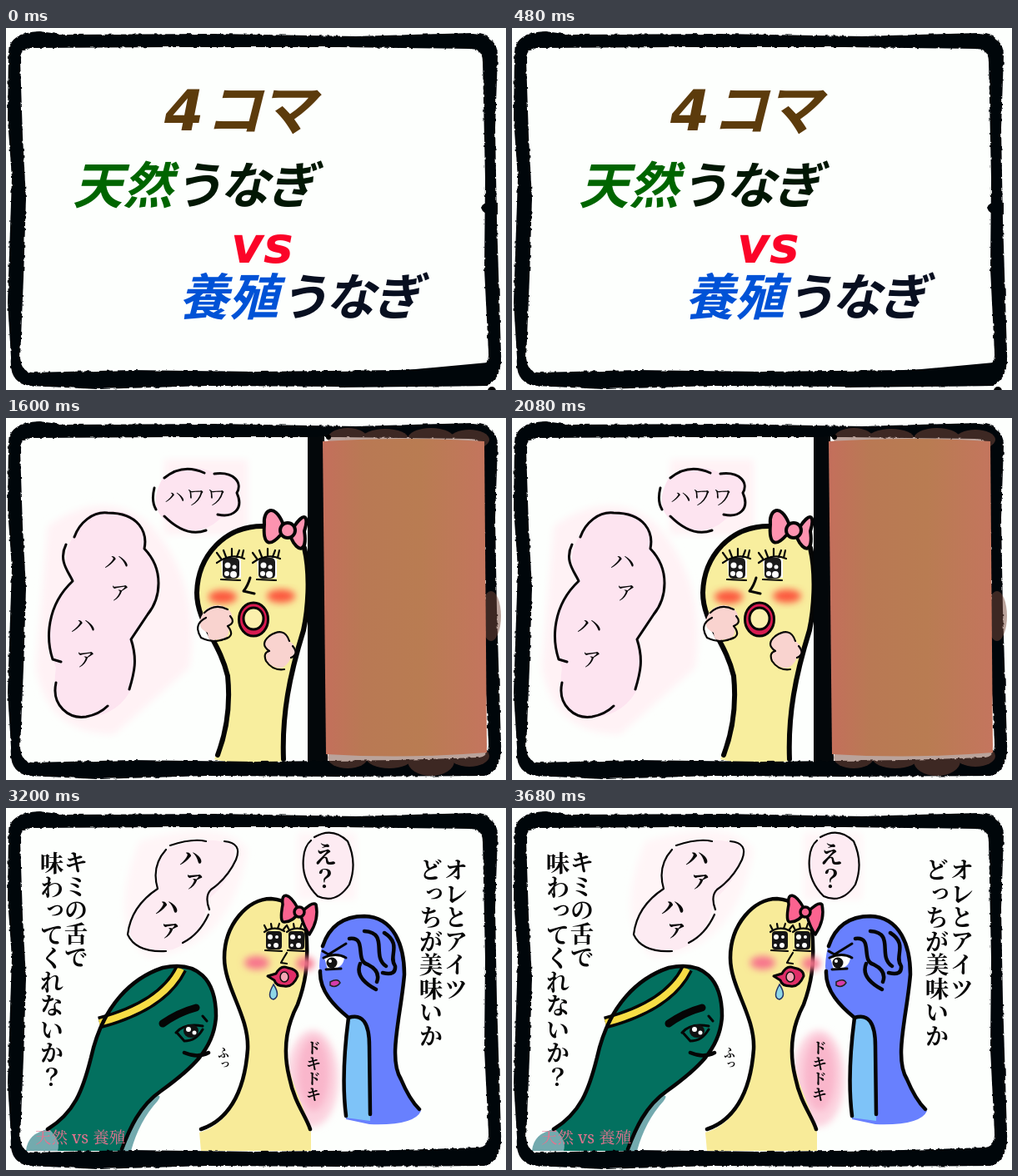
Recreate the animation shown at these times as an HTML page. Size 600 by 435 pixels, loop 4000 ms.

```html
<!DOCTYPE html>
<html lang="ja">
<head>
<meta charset="utf-8">
<title>Eel comic</title>
<style>
html, body { margin: 0; width: 100%; height: 100%; overflow: hidden; background: #fdfffd; }
svg { display: block; width: 600px; height: 435px; }
.panel { visibility: hidden; animation: show 4s step-end infinite; animation-delay: calc(var(--i) * .8s - 4s); }
@keyframes show { 0% { visibility: visible; } 20%, 100% { visibility: hidden; } }
.ink { fill: none; stroke: #050505; stroke-width: 4.5; stroke-linecap: round; stroke-linejoin: round; }
.thin { stroke-width: 2.2; }
.edge { stroke: #050505; stroke-width: 4; stroke-linejoin: round; }
.soft { filter: url(#blur); }
text { font-family: "Noto Serif CJK JP", "Noto Sans CJK JP", "Noto Sans CJK", sans-serif; font-weight: 700; fill: #080808; }
.title { font: italic bold 60px "DejaVu Sans", "Noto Sans CJK JP", "Noto Sans CJK", sans-serif; }
.kana { letter-spacing: -4px; }
.v { writing-mode: vertical-rl; }
.hand { font-weight: 500; }
</style>
</head>
<body>
<svg viewBox="0 0 600 435">
<defs>
  <filter id="rough" x="0" y="0" width="600" height="435" filterUnits="userSpaceOnUse" color-interpolation-filters="sRGB">
    <feTurbulence type="fractalNoise" baseFrequency=".2" numOctaves="1" seed="4"/>
    <feDisplacementMap in="SourceGraphic" scale="4" xChannelSelector="R" yChannelSelector="G"/>
  </filter>
  <filter id="blur" x="-40%" y="-40%" width="180%" height="180%"><feGaussianBlur stdDeviation="4"/></filter>
  <linearGradient id="bark">
    <stop offset="0" stop-color="#c46f5c"/><stop offset=".25" stop-color="#b97954"/>
    <stop offset=".6" stop-color="#b97c52"/><stop offset="1" stop-color="#c4755e"/>
  </linearGradient>
  <linearGradient id="redbark">
    <stop offset="0" stop-color="#b5271c"/><stop offset=".22" stop-color="#a0382a"/>
    <stop offset=".65" stop-color="#a2422e"/><stop offset="1" stop-color="#bd2a1a"/>
  </linearGradient>
  <linearGradient id="ugreen"><stop offset="0" stop-color="#033806"/><stop offset=".4" stop-color="#021704"/></linearGradient>
  <path id="spark" d="M0-8L2-3L6-6L4-1L8 0L4 2L6 6L2 4L0 8L-2 4L-6 6L-4 2L-8 0L-4-1L-6-6L-2-3Z" fill="#f23ad0" stroke="#f9a5e9"/>
</defs>
<rect width="600" height="435" fill="#fdfffd"/>

<g class="panel" style="--i:0">
  <text class="title kana" x="190" y="123" style="font-size:68px;fill:#5c3b0c">4<tspan dx="6">コマ</tspan></text>
  <text class="title" x="80" y="211" style="fill:#006500">天然<tspan class="kana" fill="url(#ugreen)">うなぎ</tspan></text>
  <text class="title" x="270" y="282" style="fill:#fb0428">vs</text>
  <text class="title" x="207" y="345" style="fill:#0052d6">養殖<tspan class="kana" fill="#080f20">うなぎ</tspan></text>
  <path d="M570 216Q572 208 590 210V224Q573 226 570 216ZM395 422L480 411L578 402V430L400 432Z" fill="#00060a"/>
  <circle cx="583" cy="436" r="5"/>
</g>

<g class="panel" style="--i:1">
  <path d="M146 64C153 46 180 44 200 34C214 20 232 32 252 41C256 52 252 62 253 66C280 70 284 92 268 106C280 120 272 138 252 140C250 157 234 157 220 152H186C168 158 150 156 144 143C122 142 104 126 112 112Q126 110 128 103C116 82 126 66 146 64Z" fill="#60ae02"/>
  <path d="M190 138Q202 130 216 142C216 180 224 220 236 240L196 298C176 300 160 292 146 286C180 250 188 200 190 138Z" fill="#b9572d"/>
  <path class="ink" d="M144 64C120 66 116 88 129 103C109 112 111 140 143 142C148 156 168 158 183 149M253 67C281 72 283 92 268 106C281 119 273 138 252 140C249 156 234 158 221 153M186 118C187 190 188 240 147 286M221 118C214 170 222 214 236 240"/>
  <path d="M137 207C136 190 163 188 164 207C164 220 156 224 154 240Q157 252 160 262L151 258C145 240 147 230 142 222Q137 216 137 207Z" fill="#f9efa7"/>
  <path class="ink" style="stroke-width:2.5" d="M150 260C146 244 148 230 142 222C132 210 138 194 151 194C164 196 168 212 160 222C152 234 154 246 160 260M147 228l1 8M155 227l-1 8"/>
  <g fill="#fb8549"><circle cx="142" cy="212" r="3"/><circle cx="158" cy="212" r="3"/></g>
  <g fill="#111"><circle cx="146" cy="207" r="2.5"/><circle cx="155" cy="206" r="2.5"/><ellipse cx="149" cy="214" rx="4" ry="4"/></g>
  <path d="M162 196L155 190L162 188L165 192L171 189L169 201Z" fill="#f0307e" stroke="#222" stroke-width="1.5"/>
  <use href="#spark" x="122" y="157"/><use href="#spark" x="151" y="158"/><use href="#spark" x="93" y="181"/><use href="#spark" x="145" y="182"/>
  <use href="#spark" x="125" y="188"/><use href="#spark" x="117" y="198"/><use href="#spark" x="135" y="190"/><use href="#spark" x="111" y="221"/>
  <path d="M125 227C92 236 82 258 72 284L48 338C68 346 92 342 110 330C140 318 160 320 184 326L204 298C160 300 132 286 118 262ZM275 304H510L574 276V328H275Z" fill="#73abb0"/>
  <path d="M125 326C145 317 168 318 190 323L172 342C150 331 138 332 125 326ZM250 329H512Q520 296 575 275V340Q572 372 556 372H380C330 360 290 362 245 371Z" fill="#03776c"/>
  <path class="ink" d="M125 227C96 236 80 258 72 284L49 338Q76 348 108 331C140 317 160 319 184 326M125 227Q122 245 118 258C128 282 148 297 188 296M88 262L116 271M76 290L110 306M58 322L76 330M280 304C350 301 440 306 490 303Q530 299 574 275M275 304L285 328M275 328H500M250 370C290 360 340 362 382 373Q420 370 440 372M540 372Q566 374 578 368"/>
  <path d="M446 350H470C480 366 500 378 502 396C484 414 440 412 425 392C424 378 438 366 446 350Z" fill="#73abb0"/>
  <path class="ink" d="M446 350C438 366 424 378 426 394C442 412 484 413 501 397C500 378 480 366 471 350M450 372Q443 382 447 398M461 370V400M473 371Q480 382 481 396"/>
  <path class="edge" d="M535 284Q545 275 556 285Q558 298 546 300Q538 297 535 284Z" fill="#ef5747" style="stroke-width:3"/>
  <path class="ink" d="M577 326Q574 354 562 370" style="stroke-width:8"/><path d="M577 326Q574 354 562 370" fill="none" stroke="#f6e27a" stroke-width="4"/>
  <path d="M17 308C42 322 56 350 62 392L40 414H17Z" fill="#8dc9fb"/>
  <path class="ink" d="M20 312C42 330 54 358 60 390M38 358L20 386M56 380L42 405M58 216C40 234 36 254 39 276M69 238C54 246 50 258 49 271M78 360Q98 359 112 347M82 379Q104 380 118 365" style="stroke-width:3.5"/>
  <path d="M60 406C132 396 164 370 200 300C235 232 275 192 330 177C384 166 440 172 468 190C474 160 510 142 535 142Q564 145 574 156V240L524 252Q505 262 480 248C420 248 370 245 320 262C256 288 222 340 220 413H70Z" fill="#6880fe"/>
  <path d="M220 413C222 340 256 288 320 260C370 246 420 250 484 250Q482 266 440 272C390 272 330 272 290 294C250 320 236 370 234 413Z" fill="#8dc9fb"/>
  <path class="ink" d="M60 405C132 396 164 370 200 300C235 232 275 192 330 176C384 165 440 171 464 188M460 180C480 156 510 142 535 143Q562 146 574 155M220 410C222 340 256 288 320 260C340 252 370 248 385 250M425 249L483 249Q500 262 520 258M234 410C236 360 254 318 292 293C340 268 420 276 482 261M515 150C492 166 520 192 502 206Q492 220 474 219M542 150C518 170 546 192 528 210Q520 219 504 217"/>
  <path class="edge" style="stroke-width:2.5" fill="#fff" d="M469 190C456 198 454 208 464 206Q472 203 469 190ZM486 184C470 198 468 214 479 212Q490 206 486 184Z"/>
  <path class="edge" d="M525 255C534 238 555 241 574 239Q570 260 525 256Z" fill="#fb5647"/>
  <g fill="#f6d8e3">
    <path class="soft" d="M500 52Q520 38 542 52Q550 84 538 108Q520 122 500 108Q492 80 500 52ZM382 72Q400 56 422 72Q436 94 426 130Q414 160 384 154Q362 140 370 110Q372 86 382 72Z"/>
    <path d="M390 212Q406 196 420 212Q430 238 420 260Q402 274 388 260Q380 238 390 212ZM502 308Q520 296 538 312Q548 340 538 374Q520 400 502 380Q490 344 502 308Z"/>
  </g>
  <path class="ink thin" style="stroke:#77636c" d="M504 53Q520 42 538 52Q546 66 545 84Q546 104 530 112M512 113Q494 106 497 84Q494 72 498 62M384 73Q404 56 424 74Q433 88 428 100M429 110Q432 124 414 130M410 152Q392 164 380 148M370 140Q366 122 372 106M380 90Q374 80 384 73M391 213Q405 199 418 211M423 228Q424 250 412 264M389 257Q384 250 386 240M502 311Q520 302 536 314M540 334Q544 356 534 380M506 382Q496 366 500 346"/>
  <text class="v" x="515" y="58" font-size="25">うっ</text>
  <text class="v" x="398" y="80" font-size="32">ハァ</text>
  <text class="v" x="402" y="213" font-size="20">んッ</text>
  <text class="v" x="518" y="312" font-size="32">ハァ</text>
</g>

<g class="panel" style="--i:2">
  <path class="soft" d="M50 130Q120 80 175 130Q235 200 220 300L130 380Q50 380 36 300ZM190 50H290V140H190Z" fill="#fff2f5"/>
  <path d="M82 140Q96 108 124 112C164 110 168 140 167 157C194 190 188 220 152 262Q160 300 148 330Q130 360 88 361Q52 350 60 300C44 260 54 222 82 196Q62 172 82 140ZM188 72Q224 52 250 66Q286 64 277 92Q288 114 258 120Q236 142 208 132Q164 116 188 72Z" fill="#fde4f0"/>
  <path class="ink" style="stroke-width:3" d="M82 143C88 126 104 112 122 114C160 114 170 138 166 157C190 182 186 216 170 236L150 266C158 290 154 306 148 326M72 152C62 172 76 186 80 196C48 226 48 266 56 290L66 293M60 318C54 346 76 362 96 359Q112 356 122 346M180 110Q174 100 178 84M190 72Q212 54 238 66M250 67C274 64 284 78 277 90C286 110 272 120 254 116M240 135Q216 144 190 118"/>
  <text class="hand" x="190" y="104" font-size="25">ハワワ</text>
  <g font-size="31">
    <text class="hand" x="117" y="183">ハ</text><text class="hand" x="121" y="217">ァ</text>
    <text class="hand" x="77" y="260">ハ</text><text class="hand" x="80" y="297">ァ</text>
  </g>
  <path d="M308 130C262 130 230 166 229 210C229 246 256 268 266 310Q270 370 250 410Q290 420 333 412C330 350 342 310 358 250Q368 190 358 152Q338 128 308 130Z" fill="#f8ee9e"/>
  <path class="ink" style="stroke-width:6" d="M308 130C262 130 230 166 229 210C229 246 256 268 266 310Q271 360 254 405M358 156C366 190 362 232 357 255C340 310 331 356 333 410"/>
  <g fill="#fc573d" class="soft"><ellipse cx="260" cy="215" rx="17" ry="8"/><ellipse cx="330" cy="214" rx="17" ry="8"/></g>
  <path fill="#f9d3cf" d="M240 230Q254 220 267 230Q276 240 267 250Q270 266 254 266Q242 270 242 258Q224 250 240 230ZM318 260Q336 252 340 268Q354 278 342 288Q334 306 320 298Q308 292 314 280Q304 272 318 260Z"/>
  <path class="ink thin" d="M238 234Q250 222 266 230M269 238Q276 246 266 250Q276 262 262 266M240 240Q224 248 234 264Q250 272 266 264M316 262Q334 250 340 268M344 274Q352 284 342 288M334 302Q320 304 312 292Q308 282 316 280Q304 272 316 262"/>
  <g id="eye">
    <path d="M258 170Q272 164 282 170V192H260Z" fill="#fff"/>
    <rect x="260" y="168" width="20" height="25" rx="5" fill="#1b1b1b"/>
    <path class="ink thin" d="M253 174Q270 162 286 169M258 169l-5-7M264 167l-3-8M271 166l0-9M277 167l3-8M283 168l2-9M258 194L281 195"/>
    <g fill="#fff"><circle cx="266" cy="177" r="3.5"/><circle cx="274" cy="179" r="2.5"/><circle cx="265" cy="187" r="3"/><circle cx="273" cy="188" r="4"/></g>
  </g>
  <use href="#eye" x="43"/>
  <path class="ink" style="stroke-width:3" d="M293 192Q290 202 285 208L298 211"/>
  <ellipse class="edge" cx="297" cy="242" rx="17.5" ry="20" fill="#d81b50" style="stroke-width:3"/>
  <ellipse class="edge" cx="297" cy="241" rx="12" ry="13" fill="#fbf0ad" style="stroke-width:3"/>
  <g class="edge" fill="#fd93b0">
    <path d="M332 126C322 102 308 110 310 128C308 152 316 156 330 140ZM346 130C358 112 364 118 358 136C362 162 350 162 342 144Z"/>
    <circle cx="338" cy="135" r="9"/>
  </g>
  <path d="M362 18H382L386 415H362Z" fill="#03070a"/>
</g>

<g class="panel" style="--i:3">
  <path class="soft" d="M186 40L214 50L216 215L203 210Z" fill="#fff0f3"/>
  <path d="M164 18H184L200 215L226 420H206L188 260Z" fill="#03070a" filter="url(#rough)"/>
  <path d="M298 174C332 184 354 212 358 240C352 280 338 320 341 366Q344 392 352 414H245C258 392 250 366 236 336C218 306 212 286 218 250C226 214 260 168 298 174Z" fill="#faf09d"/>
  <path d="M326 172L331 166L337 180L346 187L358 186L355 205L372 225L366 233L354 231C348 208 336 190 326 178Z" fill="#f0dc2c"/>
  <path class="ink thin" d="M326 176L331 167L337 180L346 187L358 186L355 205L372 225L366 233"/>
  <path class="ink" d="M217 250C213 290 226 312 238 336C252 366 260 390 254 410M297 174C332 184 353 214 350 250C346 290 338 320 341 366Q344 392 354 414"/>
  <g class="edge" fill="#fe1b6d" style="stroke-width:5">
    <path d="M250 186C246 160 256 148 272 149C294 152 298 168 296 184C290 204 268 206 250 186ZM246 216C258 236 248 252 234 252C218 250 206 226 211 210C220 198 238 202 246 216Z"/>
    <circle cx="251" cy="207" r="12"/>
  </g>
  <path d="M245 289C252 296 264 302 264 314C262 324 246 326 245 310Z" fill="#02b4cd"/>
  <path class="ink thin" d="M243 281Q246 300 244 312Q248 325 259 322C268 314 262 300 255 292"/>
  <path class="edge" style="stroke-width:2.5" fill="#fff" d="M386 67H532Q555 70 554 96C556 124 540 139 505 141C500 150 496 157 484 157Q488 144 482 138L427 142Q421 152 421 167Q406 160 405 142L386 138Q364 126 364 98Q364 72 386 67Z"/>
  <text x="374" y="109" font-size="24">こっちにこいよ</text>
  <g font-size="28"><text x="368" y="293">ビ</text><text x="364" y="323">ク</text><text x="370" y="351">ッ</text></g>
  <g fill="none" stroke-linecap="round">
    <path d="M427 190C428 214 448 218 468 228C496 234 506 240 504 256" stroke="#080308" stroke-width="21"/>
    <circle cx="427" cy="190" r="16" fill="#080308"/><circle cx="427" cy="190" r="12" fill="#9a1ab2"/>
    <path d="M427 190C428 214 448 218 468 228C496 234 506 240 504 258" stroke="#9a1ab2" stroke-width="13"/>
    <path d="M474 182C476 206 450 222 440 240Q434 250 435 260" stroke="#080308" stroke-width="20"/>
    <circle cx="474" cy="181" r="16" fill="#080308"/><circle cx="474" cy="181" r="12" fill="#9a1ab2"/>
    <path d="M474 182C476 206 450 222 440 240Q434 250 434 263" stroke="#9a1ab2" stroke-width="12"/>
    <path class="ink thin" d="M417 187q4 5 8 0M429 186q4 5 7 0M423 195q5 4 10-1M466 181q4 5 7 0M477 179q4 4 7 0M470 188q6 4 10-1"/>
  </g>
</g>

<g class="panel" style="--i:4">
  <path class="soft" d="M160 40Q260 10 290 50Q270 170 170 180Q120 140 160 40ZM350 30H420V110H350Z" fill="#fff5f7"/>
  <path d="M196 48Q240 32 274 44Q276 84 242 110Q236 158 200 170Q160 178 148 150Q154 116 182 96Q176 66 196 48Z" fill="#fdebf2"/>
  <ellipse cx="387" cy="70" rx="30" ry="41" fill="#fdebf2"/>
  <path class="ink thin" d="M192 50Q174 70 182 97Q150 118 146 152Q156 174 192 172M197 45Q224 36 240 40M262 40Q284 42 276 62Q266 84 246 98Q238 106 244 122M243 128Q232 152 212 162M370 35Q392 22 410 40Q422 66 412 92Q396 116 374 106Q354 86 357 60Q358 46 366 39"/>
  <g font-size="29"><text class="v" x="222" y="45">ハァ</text><text class="v" x="193" y="104">ハァ</text><text class="v" x="383" y="41">え？</text></g>
  <ellipse class="soft" cx="368" cy="325" rx="31" ry="58" fill="#fcd3df"/>
  <ellipse class="soft" cx="369" cy="320" rx="19" ry="44" fill="#f9b6cb"/>
  <path d="M25 412Q28 392 52 385C82 366 92 340 102 300C116 236 152 204 188 192C230 183 252 206 252 250C250 290 222 314 186 340C160 358 148 386 139 412Z" fill="#03705f"/>
  <path d="M24 412Q26 390 52 386Q66 400 62 412ZM140 412Q150 374 180 346Q188 344 182 352Q160 376 150 412Z" fill="#73aaae"/>
  <path d="M210 193Q188 238 112 258" fill="none" stroke="#050505" stroke-width="15"/>
  <path d="M210 193Q188 238 112 258" fill="none" stroke="#f7dd45" stroke-width="8"/>
  <path class="ink" d="M50 386C82 366 92 340 102 300C116 236 152 204 188 192C230 183 252 206 252 250C250 290 222 314 186 340C160 358 148 386 139 410M214 294Q230 301 243 294"/>
  <path class="ink" style="stroke-width:9" d="M188 259Q206 246 228 240"/>
  <path class="ink" style="stroke-width:3" d="M204 270Q214 258 236 262M206 271L214 280Q228 280 236 266M236 250l5 6"/>
  <ellipse cx="222" cy="268" rx="9" ry="8" fill="#111"/><g fill="#fff"><circle cx="219" cy="266" r="3"/><circle cx="226" cy="270" r="2.5"/></g>
  <path d="M232 390C262 382 286 350 290 290C292 250 262 216 262 180C262 140 290 109 318 109C350 110 364 150 361 180C362 230 335 250 336 290C340 332 360 360 366 390V412H234Z" fill="#f8eb99"/>
  <path class="ink" d="M234 386C264 376 286 346 290 290C292 250 262 216 262 180C262 140 290 109 318 109Q332 110 338 116M360 146C364 190 358 214 350 236C332 270 334 300 340 324C346 354 360 370 365 386"/>
  <g fill="#f7738c" class="soft"><ellipse cx="301" cy="186" rx="15" ry="8"/><ellipse cx="359" cy="187" rx="11" ry="8"/></g>
  <g id="eye2">
    <rect x="312" y="148" width="19" height="22" rx="4" fill="#151515"/>
    <path class="ink thin" d="M310 149Q322 141 334 148M313 147l-3-6M319 145l-1-6M326 145l2-6M332 147l4-5M311 171L331 172"/>
    <g fill="#fff"><circle cx="317" cy="155" r="3"/><circle cx="325" cy="155" r="2"/><circle cx="316" cy="165" r="2"/><circle cx="324" cy="165" r="3"/></g>
  </g>
  <use href="#eye2" x="27"/>
  <path class="ink thin" d="M337 174Q332 182 330 186L337 187"/>
  <path class="edge" style="stroke-width:3" d="M314 202L324 199Q330 188 338 192Q350 194 350 202Q344 216 334 214Q324 214 322 207Z" fill="#e02d67"/>
  <ellipse cx="334" cy="203" rx="5" ry="6" fill="#f7a6b5" stroke="#111" stroke-width="1.5"/>
  <path d="M321 212Q330 226 321 230Q312 228 321 212Z" fill="#8fd6e6" stroke="#236" stroke-width="1.5"/>
  <g class="edge" style="stroke-width:3.5" fill="#fb6390">
    <path d="M350 120C340 102 330 100 332 116Q328 138 334 137Q346 136 350 126ZM356 124Q368 112 372 116Q376 134 364 152Q358 144 354 130Z"/>
    <circle cx="352" cy="125" r="6"/>
  </g>
  <path d="M376 190Q378 130 430 130C466 131 478 166 478 200C474 250 458 300 476 330Q484 350 498 364Q490 382 436 380L408 374C402 330 406 290 413 254Q376 222 376 190Z" fill="#6880fe"/>
  <path d="M411 252Q436 244 436 286L437 376L407 372Q402 310 411 252Z" fill="#7ec3f8"/>
  <path class="ink" d="M408 370C403 330 406 290 411 252Q436 244 436 286L437 368M411 252C394 238 376 220 377 196M380 166Q392 130 430 130C466 131 478 166 478 200C474 250 458 300 474 326Q484 350 496 362M412 157C434 154 418 184 434 188Q450 196 445 209M425 187Q418 204 444 218M430 148C460 150 438 178 456 190M454 150C476 164 458 178 467 190Q468 202 452 198"/>
  <path d="M382 180Q394 172 406 178Q406 194 386 194Z" fill="#fff"/>
  <circle cx="391" cy="186" r="6.5" fill="#111"/><circle cx="389" cy="184" r="2" fill="#fff"/>
  <path class="ink" style="stroke-width:3" d="M380 172L387 176L408 163M381 180Q396 173 408 180M384 194L402 193"/>
  <path d="M389 209Q398 204 401 210Q396 217 389 213Z" fill="#d53baa" stroke="#222" stroke-width="1.5"/>
  <g font-size="28.5">
    <text class="v" x="540" y="60">オレとアイツ</text><text class="v" x="510" y="60">どっちが美味いか</text>
    <text class="v" x="84" y="51">キミの舌で</text><text class="v" x="55" y="52">味わってくれないか？</text>
  </g>
  <text class="v" x="261" y="287" font-size="14">ふっ</text>
  <text class="v" x="369" y="279" font-size="18.5">ドキドキ</text>
</g>

<path filter="url(#rough)" fill="#00060a" fill-rule="evenodd" d="M3 28Q4 6 40 4L70 8L250 7L420 10L560 6Q590 7 590 34L587 120L589 230L594 390Q596 424 574 430L400 431L240 430L110 434L30 430Q3 428 6 396L2 330L5 240L7 180L2 110Z M30 24Q17 24 17 38L20 130L24 205L21 300L17 396Q18 413 32 414L150 411L300 413L470 411L566 408Q580 408 579 390L574 290L575 180L572 40Q572 25 556 25L400 23L200 23Z"/>

<g class="panel" style="--i:2">
  <g fill="#7a4a3c" opacity=".5">
    <ellipse cx="410" cy="25" rx="24" ry="13"/><ellipse cx="455" cy="25" rx="28" ry="12"/><ellipse cx="510" cy="25" rx="28" ry="13"/><ellipse cx="556" cy="26" rx="24" ry="12"/>
    <ellipse cx="410" cy="408" rx="24" ry="13"/><ellipse cx="460" cy="408" rx="28" ry="13"/><ellipse cx="510" cy="412" rx="28" ry="18"/><ellipse cx="556" cy="406" rx="24" ry="13"/><ellipse cx="582" cy="238" rx="12" ry="30"/>
  </g>
  <path d="M380 28Q480 22 574 28L577 402Q480 410 384 404Z" fill="url(#bark)"/>
  <circle cx="387" cy="23" r="3"/>
</g>
<g class="panel" style="--i:3">
  <g fill="#7a3020" opacity=".5">
    <ellipse cx="35" cy="28" rx="24" ry="12"/><ellipse cx="80" cy="27" rx="28" ry="12"/><ellipse cx="138" cy="26" rx="27" ry="11"/>
    <ellipse cx="40" cy="408" rx="24" ry="12"/><ellipse cx="95" cy="408" rx="28" ry="13"/><ellipse cx="150" cy="406" rx="28" ry="12"/><ellipse cx="188" cy="408" rx="22" ry="16"/><ellipse cx="12" cy="110" rx="9" ry="85"/>
  </g>
  <path d="M14 30Q90 22 163 28L190 270L207 402Q110 408 20 404Z" fill="url(#redbark)"/>
</g>
<g class="panel" style="--i:4">
  <text x="35" y="403" font-size="19.5" style="fill:#e5738f;font-weight:500;font-family:'Noto Serif','Noto Serif CJK JP','Noto Sans CJK JP',serif">天然 vs 養殖</text>
</g>
</svg>
</body>
</html>
```
